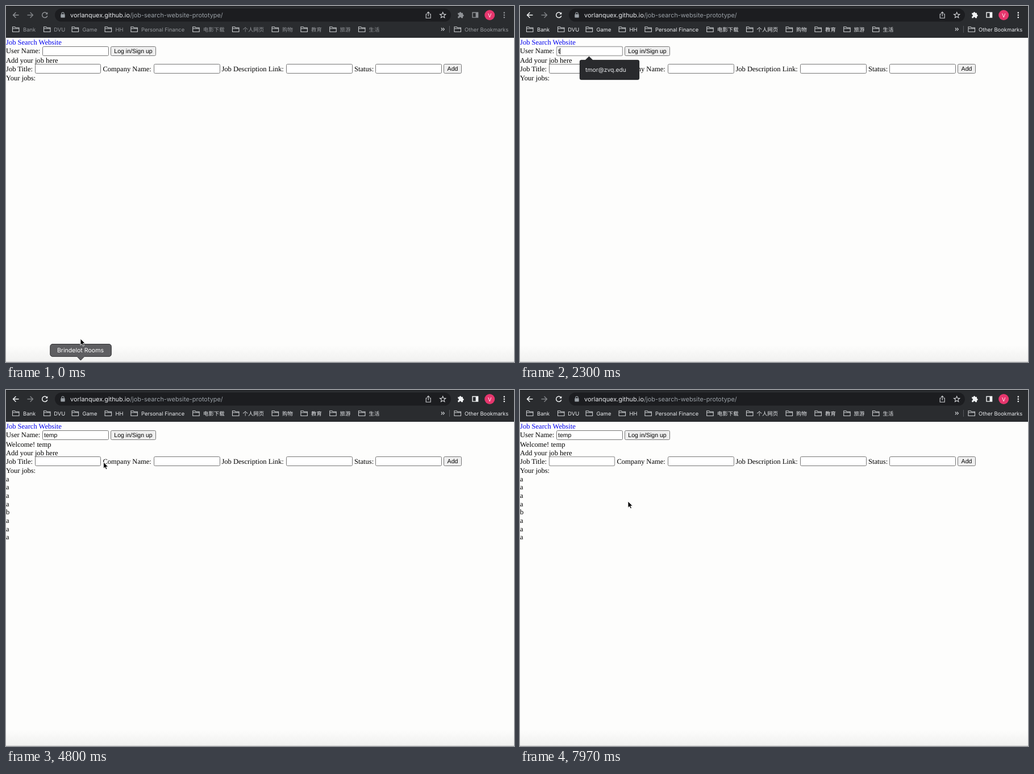
Animation, 894 px wide and 627 px high, one loop 8000 ms. Source, as an HTML page:

```html
<!DOCTYPE html>
<html lang="en">
<head>
<meta charset="utf-8">
<title>Job search page</title>
<style>
  html, body { margin: 0; width: 100%; height: 100%; overflow: hidden; background: #fdfdfc; }
  svg { display: block; width: 894px; height: 627px; }
  text { white-space: pre; text-rendering: geometricPrecision; }
  .page { font: 12.55px "Liberation Serif", serif; }
  .form { font: 10.55px "Liberation Sans", sans-serif; }
  .ui { font: 9.4px Inter, "Noto Sans CJK SC", "Noto Sans CJK", sans-serif; }
  .url { font-size: 10.9px; }
  .hint { font-size: 10.4px; fill: #e8eaed; }
  .icon { fill: none; stroke-width: 1.5; }
</style>
</head>
<body>
<svg id="stage" viewBox="0 0 894 627">
  <defs>
    <linearGradient id="shade" x1="0" y1="0" x2="0" y2="1">
      <stop offset="0" stop-color="#fdfdfc"/>
      <stop offset="1" stop-color="#f1f1f0"/>
    </linearGradient>
  </defs>
  <rect width="894" height="627" fill="#fdfdfc"/>
  <rect y="598" width="894" height="28" fill="url(#shade)"/>
  <rect y="626" width="894" height="1" fill="#d2d2d2"/>

  <g id="bar" class="ui">
    <rect width="894" height="56" fill="#2a2c2f"/>
    <rect width="894" height="1" fill="#1c1d20"/>
    <rect x="86" y="4.5" width="697" height="23" rx="11.5" fill="#1c1d20"/>
    <path class="icon" stroke="#7f8286" d="M37.5 16H47M42.6 11.2L47.4 16L42.6 20.8"/>
    <g id="nav" class="icon">
      <path d="M22.5 16H13M17.4 11.2L12.6 16L17.4 20.8"/>
      <path d="M72.2 13.2A4.7 4.7 0 1 0 72.8 17.3"/>
      <path d="M73.3 10.8V14.8H69.3Z" stroke="none" fill="currentColor"/>
    </g>
    <g fill="#9aa0a6">
      <rect x="96.3" y="14.6" width="7.4" height="6" rx=".8"/>
      <path d="M97.9 15V13.4a2.1 2.1 0 0 1 4.2 0V15" fill="none" stroke="#9aa0a6" stroke-width="1.1"/>
    </g>
    <text class="url" x="218" y="19.8" text-anchor="end" fill="#e8eaed">vorlanquex.github.io</text>
    <text class="url" x="218.2" y="19.8" fill="#9aa0a6">/job-search-website-prototype/</text>
    <g fill="none" stroke="#d0d2d5" stroke-width="1.1">
      <path d="M741 14.3H739.2V21.2H747.2V14.3H745.4M743.2 18V10.8M740.9 12.9L743.2 10.6L745.5 12.9"/>
      <path id="star"/>
    </g>
    <g id="tools" fill="currentColor">
      <path d="M795.3 12.3H797.8A1.7 1.7 0 0 1 801.2 12.3H804V15A1.7 1.7 0 0 1 804 18.4V21.3H801.2A1.7 1.7 0 0 0 797.8 21.3H795.3V18.4A1.7 1.7 0 0 0 795.3 15Z"/>
      <path fill-rule="evenodd" d="M820.3 10.8H831.3V20.8H820.3ZM821.7 12.2V19.4H826.6V12.2Z"/>
      <circle cx="876.8" cy="11.9" r="1.3"/><circle cx="876.8" cy="16" r="1.3"/><circle cx="876.8" cy="20.1" r="1.3"/>
    </g>
    <circle cx="851.2" cy="16" r="9" fill="#e6366d"/>
    <text x="851.2" y="19.5" text-anchor="middle" fill="#fff">V</text>
    <g id="marks" fill="currentColor"></g>
    <path d="M780.5 35V47" stroke="#55585c"/>
    <path d="M766 38.5L768 41L766 43.5M769.2 38.5L771.2 41L769.2 43.5" fill="none" stroke="#e8eaed" stroke-width="1.2"/>
  </g>

  <g class="page">
    <text x="0" y="67.8" fill="#0000ee">Job Search Website</text>
    <text x="0" y="83">User Name:</text>
    <text id="hello" x="0" y="99.7">Welcome! temp</text>
  </g>
  <g id="login"></g>
  <g id="lower" class="page">
    <text x="0" y="99.5">Add your job here</text>
    <text x="0" y="114.8">Job Title:</text>
    <text x="170.4" y="114.8">Company Name:</text>
    <text x="379.4" y="114.8">Job Description Link:</text>
    <text x="613" y="114.8">Status:</text>
    <text x="0" y="131.2">Your jobs:</text>
    <g id="jobs"></g>
  </g>
  <text id="typed" class="form" x="67" y="83"></text>
  <path id="caret" stroke="#000" fill="none"/>

  <g id="popup" class="ui">
    <path id="sheet" fill="#292a2d" stroke="#000" stroke-opacity=".25"/>
  </g>
  <g id="tip">
    <path d="M82 595.5H181A4 4 0 0 1 185.3 599.5V613A4 4 0 0 1 181 617.3H138L131.4 624L125 617.3H82A4 4 0 0 1 77.8 613V599.5A4 4 0 0 1 82 595.5Z" fill="#5e5e61" stroke="#2f2f31"/>
    <text class="ui" x="131" y="610" text-anchor="middle" style="font-size:10.6px" fill="#fff">Brindelot Rooms</text>
  </g>
  <path id="arrow" d="M0 0V11.4L2.6 9L4.5 13L6.5 12.1L4.7 8.2H8.3Z" fill="#000" stroke="#fff" stroke-width=".9"/>
  <path id="beam" d="M-2 -6Q0 -6 0 -4.5Q0 -6 2 -6M0 -4.5V4.5M-2 6Q0 6 0 4.5Q0 6 2 6" fill="none" stroke="#222"/>
</svg>
<script>
const LOOP = 8000, ROW = 15, HINT = 24.4;
const $ = id => document.getElementById(id);

function add(parent, tag, attrs, text = "") {
  const node = document.createElementNS("http://www.w3.org/2000/svg", tag);
  for (const key in attrs) node.setAttribute(key, attrs[key]);
  node.textContent = text;
  parent.append(node);
  return node;
}

function box(parent, x, y, width, fill) {
  return add(parent, "rect", { x: x + .5, y: y + .5, width: width - 1, height: 16, rx: 2, fill, stroke: "#767676" });
}

function button(parent, x, y, width, label) {
  const face = box(parent, x, y, width, "#efefef");
  add(parent, "text", { class: "form", x: x + width / 2, y: y + 12.2, "text-anchor": "middle" }, label);
  return face;
}

// Bookmarks: folder x, label x, label
[[11, 30, "Bank"], [66, 84.3, "DVU"], [115.6, 134.5, "Game"], [173.6, 192.5, "HH"],
 [219.4, 238, "Personal Finance"], [328.2, 347, "电影下载"], [398, 416.6, "个人网页"],
 [467.6, 486, "购物"], [518.4, 537, "教育"], [569.2, 587.6, "旅游"], [620, 638.6, "生活"],
 [788.5, 807, "Other Bookmarks"]].forEach(([fx, x, label]) => {
  add($("marks"), "path", {
    d: `M${fx + .5} 45.5V36.8H${fx + 4.6}L${fx + 6} 38.3H${fx + 12}V45.5ZM${fx + .5} 39.8H${fx + 12}`,
    fill: "none", stroke: "#c8cacd", "stroke-width": 1.1
  });
  add($("marks"), "text", { x, y: 44.5 }, label);
});

const star = Array.from({ length: 10 }, (_, i) => {
  const r = i % 2 ? 2.4 : 5.4, a = Math.PI * (i / 5 - .5);
  return (768.7 + r * Math.cos(a)).toFixed(2) + " " + (16.3 + r * Math.sin(a)).toFixed(2);
});
$("star").setAttribute("d", "M" + star.join("L") + "Z");

const user = box($("login"), 64, 71, 117, "#fff");
const sign = button($("login"), 184, 71, 80, "Log in/Sign up");
const fields = [51, 260, 493, 650].map(x => box($("lower"), x, 102, x === 51 ? 116 : 117, "#fff"));
const addJob = button($("lower"), 770, 102, 32, "Add");
[..."aaaabaaa"].forEach((job, i) => add($("jobs"), "text", { x: 0, y: 145.8 + i * 14.65 }, job));

const hints = ["tmor@zvq.edu", "a", "b", "abc", "demo", "user", "guest"].map((word, i) =>
  add($("popup"), "text", { class: "hint", x: 115, y: 116.4 + i * HINT }, word));

// Suggestion list with room for the given number of rows
function drawHints(rows) {
  const end = 105.6 + rows * HINT;
  $("sheet").setAttribute("d", `M108 95H115L121.5 88.8L128 95H207A3 3 0 0 1 210 98V${end - 3}A3 3 0 0 1 207 ${end}H108A3 3 0 0 1 105 ${end - 3}V98A3 3 0 0 1 108 95Z`);
  hints.forEach((hint, i) => hint.setAttribute("display", i < rows ? "inline" : "none"));
  $("popup").setAttribute("display", rows ? "inline" : "none");
}

// Pointer stops: time, x, y
const stops = [
  [30, 131, 586], [760, 130, 79], [3060, 130, 79], [3360, 242, 77.5], [4600, 242, 77.5],
  [4690, 262, 122], [4800, 171.5, 127], [5000, 171.5, 127], [5250, 22, 158], [5560, 14, 306],
  [5800, 18, 232], [5960, 14, 152], [6130, 25, 235], [6730, 25, 235], [7130, 96, 126],
  [7770, 96, 126], [7960, 190, 196]
];

function pointer(t) {
  const i = stops.findIndex(s => s[0] > t);
  if (i === 0) return stops[0].slice(1);
  if (i < 0) return stops[stops.length - 1].slice(1);
  const [t0, x0, y0] = stops[i - 1], [t1, x1, y1] = stops[i];
  const u = (t - t0) / (t1 - t0), k = u * u * (3 - 2 * u);
  return [x0 + (x1 - x0) * k, y0 + (y1 - y0) * k];
}

const within = (t, from, to) => t >= from && t < to;
const show = (id, on) => $(id).setAttribute("visibility", on ? "visible" : "hidden");
const blink = (t, since) => (t - since) % 1000 < 500;

function draw(t) {
  const active = t >= 870, ready = t >= 1070, logged = t >= 4000;
  const shift = logged ? ROW : 0;
  const [x, y] = pointer(t);

  $("nav").style.stroke = $("nav").style.color = $("tools").style.color = active ? "#f1f3f4" : "#8f9296";
  $("marks").style.color = active ? "#e8eaed" : "#94979b";

  show("hello", logged);
  show("jobs", logged);
  $("lower").setAttribute("transform", `translate(0 ${shift})`);

  const letters = [2000, 2830, 2930, 3030].filter(s => t >= s).length;
  $("typed").textContent = "temp".slice(0, letters);

  const inUser = within(t, 1070, 3600), inTitle = t >= 7330;
  const over = (node, dy) => {
    const b = node.getBBox();
    return ready && within(x, b.x, b.x + b.width) && within(y - dy, b.y, b.y + b.height);
  };
  const border = (node, dy, focus) => {
    const hover = over(node, dy);
    node.setAttribute("stroke", focus ? "#a8a8a8" : hover ? "#4f4f4f" : "#767676");
    node.setAttribute("stroke-width", focus ? 1.5 : 1);
    return hover;
  };
  const overField = [border(user, 0, inUser), ...fields.map((f, i) => border(f, shift, inTitle && i === 0))].some(Boolean);
  sign.setAttribute("fill", within(t, 3600, 3700) ? "#f5f5f5" : over(sign, 0) ? "#dedede" : "#efefef");
  addJob.setAttribute("fill", over(addJob, shift) ? "#dedede" : "#efefef");

  const caretX = inTitle ? 54.5 : 67.5 + (letters ? $("typed").getComputedTextLength() : 0);
  const caretY = inTitle ? 120 : 74;
  $("caret").setAttribute("d", `M${caretX} ${caretY}v11`);
  const typing = within(t, 2000, 3100);
  show("caret", inTitle ? blink(t, 7330) : inUser && (typing || blink(t, letters ? 3100 : 1070)));

  drawHints(within(t, 1200, 2030) ? hints.length : within(t, 2030, 2860) ? 1 : 0);
  $("tip").setAttribute("opacity", Math.max(0, Math.min(1, (160 - t) / 100)));

  const hidden = within(t, 2000, 3060);
  for (const id of ["arrow", "beam"]) $(id).setAttribute("transform", `translate(${x} ${y})`);
  show("arrow", !hidden && !overField);
  show("beam", !hidden && overField);
}

let start;
function tick(now) {
  start ??= now;
  draw((now - start) % LOOP);
  requestAnimationFrame(tick);
}
draw(0);
requestAnimationFrame(tick);
</script>
</body>
</html>
```
